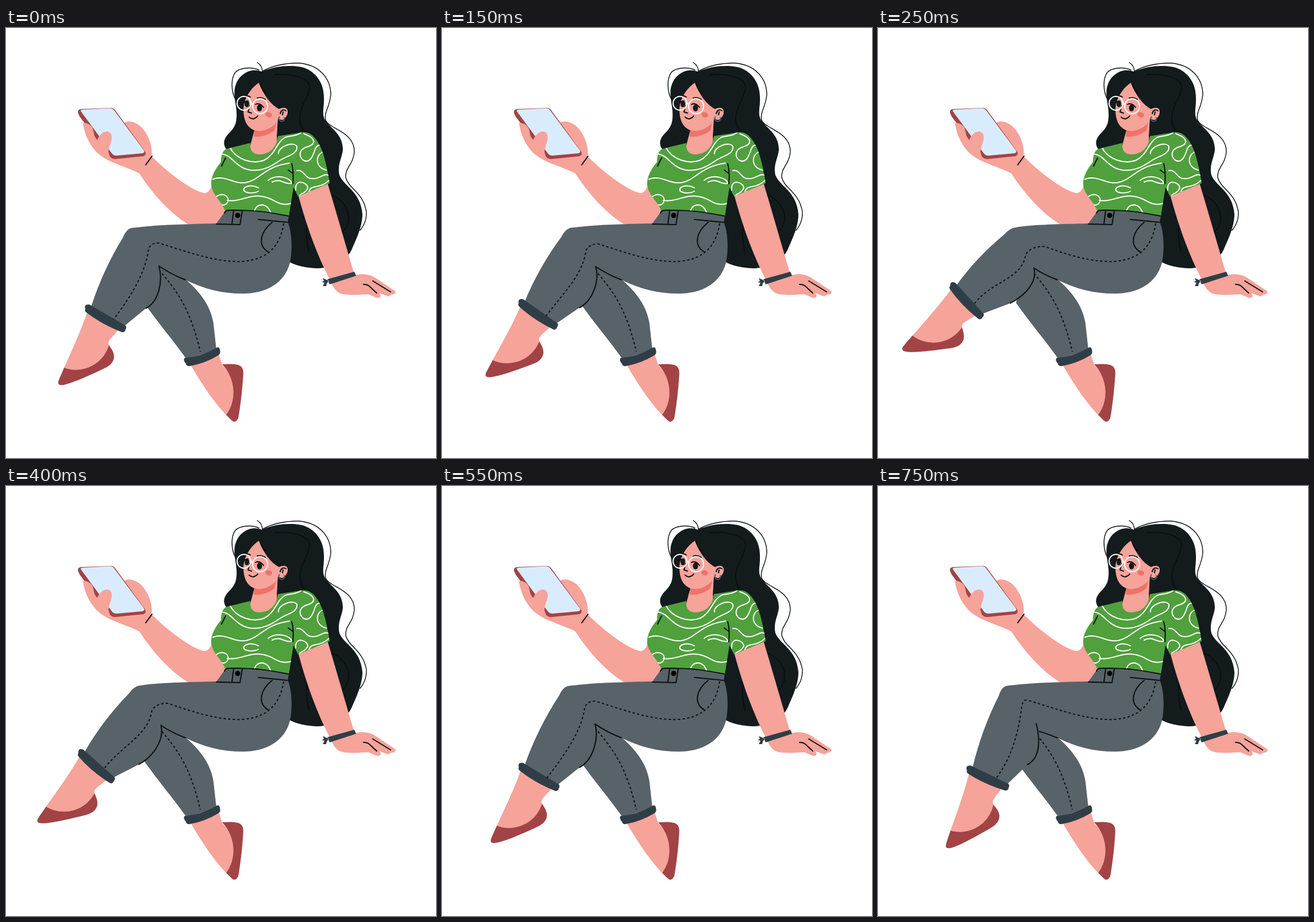
Write an HTML page that moves like this. It is 748 by 748 pixels and loops after 1300 ms.

```html
<!DOCTYPE html>
<html lang="en">
<head>
<meta charset="utf-8">
<title>Woman with a phone</title>
<style>
html, body { margin: 0; width: 100%; height: 100%; overflow: hidden; background: #fff; }
svg { display: block; width: 100vw; height: 100vh; }
.skin { fill: #f6a39a; }
.hair { fill: #131b1d; }
.pants { fill: #586269; }
.cuff { fill: #2f3e46; }
.shoe { fill: #a24345; }
.coral { fill: #ee7368; }
.line, .stitch, .thin, .white { fill: none; stroke: #0b0f10; stroke-width: 2; stroke-linecap: round; stroke-linejoin: round; }
.thin { stroke-width: 1.4; }
.white { stroke: #fff; }
.stitch { stroke-dasharray: 4 4; stroke-linecap: butt; }
</style>
</head>
<body>
<svg viewBox="0 0 748 748">
  <defs>
    <clipPath id="shirtClip"><use href="#shirt"/></clipPath>
  </defs>

  <!-- hair -->
  <path class="thin" d="M400 126C391 110 391 88 399 77C407 69 427 67 440 73M446 76C446 69 442 63 437 60M446 75C465 65 488 61 508 61C545 63 565 88 565 116C563 138 553 146 556 160C562 176 606 180 606 215C604 238 590 242 591 260C596 280 621 285 627 320C627 336 622 344 616 352"/>
  <path class="hair" d="M445 76C470 65 500 64 518 69C541 77 553 98 553 120C554 136 549 148 554 158C562 174 586 182 586 212C584 228 576 238 580 256C588 276 617 284 620 324C620 346 608 370 602 384C592 408 565 418 540 418C518 417 505 413 493 407L478 230L384 212C376 202 379 192 388 183C399 172 402 164 401 145C400 130 394 112 400 98C406 80 427 68 445 76Z"/>
  <path class="line" d="M467 81C500 79 529 87 528 104C526 122 512 136 511 155C511 168 514 176 521 181M567 291C588 300 600 320 595 339C592 349 586 355 580 359M524 338C521 358 523 374 527 390"/>

  <!-- far arm and hand -->
  <path class="skin" d="M505 278L557 262C572 312 590 374 604 422L608 430C617 427 631 428 640 433L676 457C680 461 676 464 670 464L665 467L649 461C655 467 650 471 644 469L630 463C616 464 590 466 580 461C572 456 568 449 566 442C545 405 522 345 505 278Z"/>
  <path class="cuff" d="M559 437L606 424L609 431L563 446ZM562 440L551 435L553 440L549 442L554 443L551 449L557 449L558 444Z"/>
  <path class="line" d="M622 446C631 445 634 452 645 461M638 440L669 459"/>

  <!-- phone arm -->
  <path class="skin" d="M134 165C137 188 149 211 166 223C184 236 214 243 232 253C252 284 282 320 316 341L375 342L390 305L358 274C354 284 350 288 343 287C316 279 277 247 253 223C256 208 248 186 237 174C228 164 214 160 207 164L190 185L150 175Z"/>
  <path class="shoe" d="M125 147Q125 141 131 141L182 139Q187 139 190 143L242 215Q245 220 239 223L190 228Q184 228 180 223L128 154Z"/>
  <path fill="#d9ecfd" d="M131 146Q128 142 134 142L181 139.500Q185 139.500 188 143L240 213Q242 217 237 218L192 222Q187 222 184 218Z"/>
  <path class="skin" d="M134 165C141 165 148 168 151 175C153 183 154 191 158 197C160 189 168 179 177 180C186 182 185 194 181 203C179 209 179 212 178 215L182 228L166 222C149 210 137 188 134 165Z"/>
  <path class="line" d="M254 223L243 238"/>

  <!-- neck and face -->
  <path class="skin" d="M440 95C426 105 414 121 413 142C413 160 419 173 432 178L425 204L424 222L470 222L473 162C480 162 488 157 490 148C491 138 484 137 475 141C461 134 447 115 440 95Z"/>
  <path class="coral" d="M432 178C447 182 461 175 470 165L467 178C457 186 445 190 431 189Z"/>
  <path class="hair" d="M473 158L487 162C484 176 488 181 492 187L471 190Z"/>
  <ellipse class="coral" cx="457" cy="151" rx="6" ry="4.500" transform="rotate(15 457 151)"/>
  <path class="line" d="M477 149C478 143 483 141 487 144M482 146L481 151M424 135L421 146L427 148M423 155C428 160 434 158 438 153M441 95C444 103 446 109 451 113"/>
  <path class="line" d="M414 121Q420 116 425 120M437 122Q444 120 451 124"/>
  <g class="hair">
    <ellipse cx="419" cy="132" rx="4" ry="6"/>
    <ellipse cx="441" cy="139" rx="4.500" ry="6"/>
  </g>
  <path class="line" d="M413 129L421 127M434 133Q441 129 448 138"/>
  <g class="white">
    <circle cx="414" cy="131" r="12"/>
    <circle cx="442" cy="136" r="13"/>
    <path d="M426 131L430 132"/>
  </g>
  <path fill="none" stroke="#475a66" stroke-width="2" d="M476 154A5 5 0 1 0 484 155"/>

  <!-- shirt -->
  <path id="shirt" fill="#50a03d" d="M425 200L384 210C375 214 374 224 374 233C363 246 356 260 357 273C359 290 374 300 382 319L492 328L500 277L508 293L563 270C558 238 551 205 536 190C529 182 520 180 511 182L473 188C471 207 460 219 441 220C428 220 424 212 425 200Z"/>
  <g class="white" clip-path="url(#shirtClip)">
    <path d="M389 207C400 229 429 238 449 230C469 220 470 199 486 190C494 187 504 189 513 182"/>
    <path d="M375 219C394 221 398 242 424 247C446 250 463 240 477 230C490 222 508 219 506 206C500 196 472 207 474 219"/>
    <path d="M360 263C382 255 395 272 417 269C441 265 449 241 493 235"/>
    <path d="M439 278C426 271 411 276 414 283C419 288 432 288 439 284"/>
    <path d="M365 294C376 285 389 292 386 302C383 309 377 309 370 306M385 300C409 303 421 289 446 293C468 296 473 312 497 305"/>
    <path d="M432 320C434 304 456 302 461 324M456 265C472 253 496 261 497 270C486 274 478 260 463 268"/>
    <path d="M518 184C537 190 541 201 526 206C507 211 510 224 517 230C528 236 533 224 536 216C540 201 547 202 552 207M550 216C536 224 540 244 557 247"/>
    <path d="M504 282C502 260 525 269 525 278C521 289 513 287 511 291M506 248C519 246 519 262 533 262C546 263 552 252 561 256M527 285C530 271 546 281 562 265"/>
  </g>
  <path class="line" d="M382 226L375 240M497 236C500 247 500 259 499 271M491 247L499 253"/>

  <!-- back leg -->
  <path class="skin" d="M320 584C340 619 364 654 384 674C402 650 402 613 376 586L370 568Z"/>
  <path class="shoe" d="M376 585C390 584 404 584 409 589C414 594 413 601 412 613C410 640 407 662 404 679Q398 689 392 682L383 673C400 651 402 613 376 585Z"/>
  <path class="pants" d="M262 410L312 437C342 463 357 487 361 515L366 560L314 576C292 545 264 512 240 478Z"/>
  <path class="cuff" d="M311 574Q338 572 365 557Q371 553 372 560Q374 566 370 569Q345 584 320 588Q314 589 313 584Q307 577 311 574Z"/>
  <path class="stitch" d="M266 421C302 462 321 492 338 563"/>

  <!-- moving leg -->
  <g id="foot">
    <path class="skin" d="M141 495C131 525 112 567 101 591C130 608 170 588 181 554C174 546 181 542 194 527L200 512Z"/>
    <path class="shoe" d="M101 591C130 602 168 588 179 552C184 558 188 565 188 572C187 584 178 589 167 594C148 603 122 615 104 620Q89 624 91 615C94 606 98 599 101 591Z"/>
  </g>
  <path id="leg" class="pants"/>
  <path id="cuff" class="cuff" d="M145 481L205 516Q210 518 209 522L207 527Q204 531 199 528Q166 515 140 495Q136 492 138 489Q135 480 145 481Z"/>
  <path id="seam" class="line"/>
  <path id="stitch" class="stitch"/>

  <!-- waist details -->
  <path class="line" d="M380 322C382 316 387 317 394 317C430 316 460 321 491 327M366 341L407 342M396 318L393 341M411 318L407 342M439 333L489 338M463 338C443 354 436 378 457 390"/>
  <circle cx="403" cy="326" r="4.500"/>
</svg>
<script>
const LOOP = 1300, STEP = 50, DROP_START = 400;
const PIVOT = { x: 173.5, y: 505.5 };

// Cuff position and turn; the rest of the leg follows from them
const key = (t, x, y, turn) => ({ t, x, y, turn });
const lift = [key(0, 173.5, 505.5, 0), key(150, 167.5, 498.5, 4.8), key(250, 154.5, 475, 17.3)];
const drop = [key(400, 157.5, 488, 11.3), key(550, 169, 506.5, 0.8), key(650, 179, 507.5, -2.1), key(750, 191.5, 508.5, -4.6)];

const el = id => document.getElementById(id);
const foot = el("foot"), cuff = el("cuff"), leg = el("leg"), seam = el("seam"), stitch = el("stitch");

// Smooth curve through the keys of one move, held after the last
function sample(keys, t) {
  const last = keys.length - 1;
  if (t >= keys[last].t) return keys[last];
  const i = keys.findIndex((k, n) => t < keys[n + 1].t);
  const a = keys[i], b = keys[i + 1], span = b.t - a.t, u = (t - a.t) / span;
  const mix = name => {
    const slope = k => {
      const p = keys[Math.max(k - 1, 0)], q = keys[Math.min(k + 1, last)];
      return (q[name] - p[name]) / (q.t - p.t) * span;
    };
    const d = b[name] - a[name], m0 = slope(i), m1 = slope(i + 1);
    return a[name] + u * (m0 + u * (3 * d - 2 * m0 - m1 + u * (m0 + m1 - 2 * d)));
  };
  return { x: mix("x"), y: mix("y"), turn: mix("turn") };
}

function draw({ x, y, turn }) {
  const r = turn * Math.PI / 180, cos = Math.cos(r), sin = Math.sin(r);
  const place = (px, py) => {
    const dx = px - PIVOT.x, dy = py - PIVOT.y;
    return [x + dx * cos - dy * sin, y + dx * sin + dy * cos];
  };
  const move = `translate(${x} ${y}) rotate(${turn}) translate(${-PIVOT.x} ${-PIVOT.y})`;
  foot.setAttribute("transform", move);
  cuff.setAttribute("transform", move);

  // The knee slides along the thigh line
  const bend = Math.abs(turn);
  const kneeX = 211 + 1.15 * bend, kneeY = 341 + (365 - kneeX) * 0.046;
  const [frontX, frontY] = place(148, 485), [backX, backY] = place(204, 520);
  const shinX = kneeX + (frontX - kneeX) * 0.12, shinY = kneeY + (frontY - kneeY) * 0.12;
  const bulgeX = (shinX + frontX) / 2 - 7, bulgeY = (shinY + frontY) / 2 - 4;

  // The crease opens downwards when the leg swings inwards
  const topX = 266 + Math.max(0.3 * turn, -2 * turn), topY = 414 + 0.2 * turn;
  const lip = Math.max(0, -3 * turn);
  const endX = x + 70 + 0.33 * turn, endY = y - 18 + 1.25 * turn;
  const crease = `${endX} ${endY}C${endX + 23} ${endY - 12} ${topX + 7} ${topY + 26} ${topX} ${topY}`;
  const fold = `${topX + lip * 0.4} ${topY + lip}Q288 429 312 438`;
  leg.setAttribute("d",
    `M382 318L366 340C320 341 265 342 ${kneeX + 10} ${kneeY - 0.5}Q${kneeX - 1} ${kneeY} ${shinX} ${shinY}` +
    `Q${bulgeX} ${bulgeY} ${frontX} ${frontY}L${backX} ${backY}L${crease}L${fold}` +
    `C345 454 375 462 412 462C452 462 485 444 494 408C499 385 497 352 490 338L492 327Q430 316 382 318Z`);
  seam.setAttribute("d", `M${crease}M${fold}`);

  const inX = 266 + 1.4 * turn, inY = 374 + 0.35 * turn;
  const outX = 248 + 0.5 * bend, outY = 384 + 0.6 * turn;
  const [hemX, hemY] = place(187, 507);
  stitch.setAttribute("d",
    `M483 340C478 373 461 402 412 406C368 408 326 393 ${inX} ${inY}` +
    `Q${outX + (inX - outX) * 0.3} ${inY - 1} ${outX} ${outY}` +
    `C${outX - 5} ${outY + 42} ${hemX + 30} ${hemY - 40} ${hemX} ${hemY}`);
}

function frame(now) {
  const t = Math.floor((now % LOOP) / STEP) * STEP;
  draw(sample(t < DROP_START ? lift : drop, t));
  requestAnimationFrame(frame);
}
draw(lift[0]);
requestAnimationFrame(frame);
</script>
</body>
</html>
```
